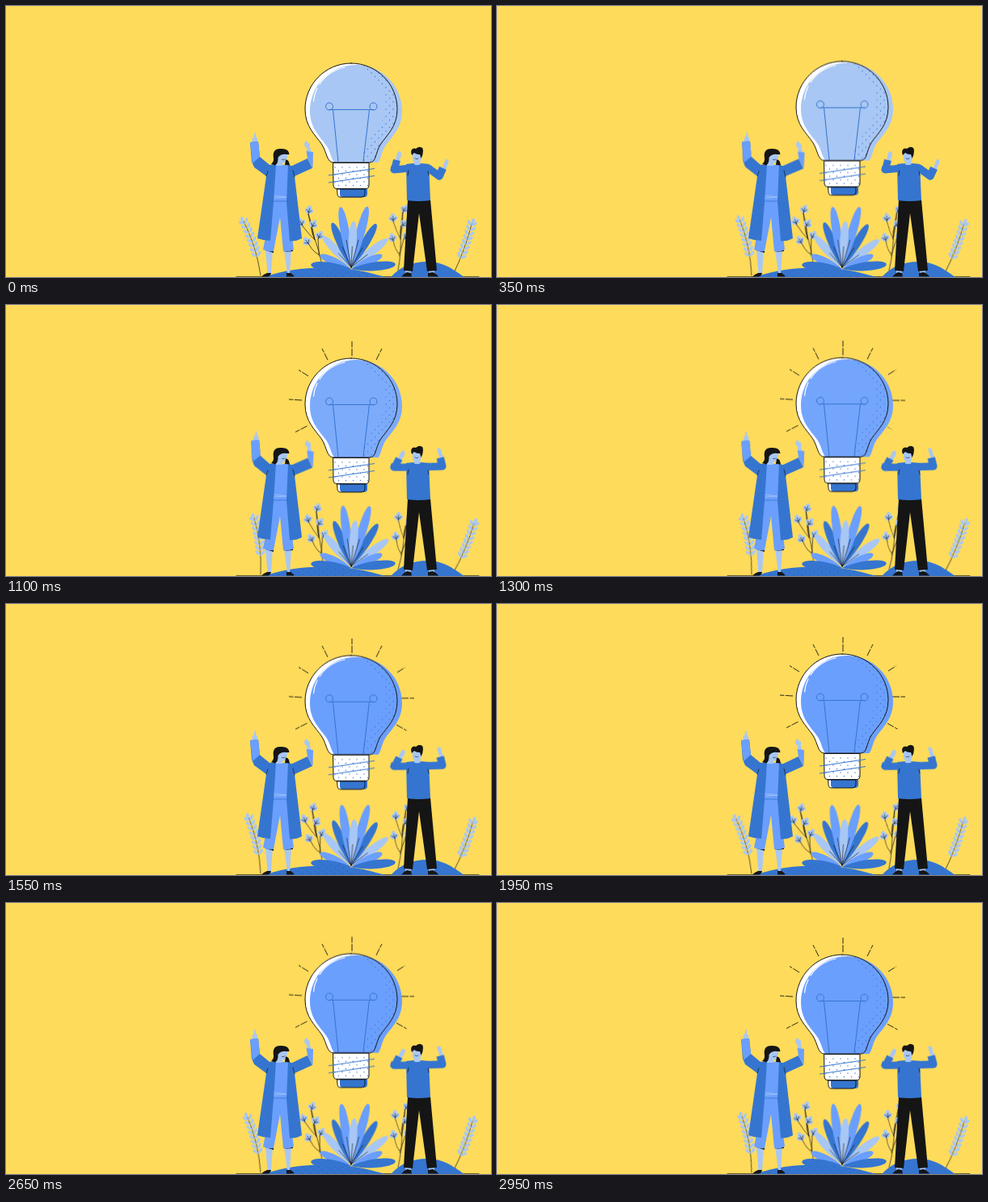
Animation of 600x336 px, one loop 3000 ms. Source, as an HTML page:

```html
<!DOCTYPE html>
<html lang="en">
<head>
<meta charset="utf-8">
<title>Bright idea</title>
<style>
@property --p { syntax: "<number>"; inherits: true; initial-value: 0; }
:root { --light: #a8c7f4; --mid: #6b9ffd; --dark: #3575d0; --ink: #151515; }
html, body { margin: 0; width: 100%; height: 100%; overflow: hidden; background: #fedb5a; }
svg { display: block; width: 600px; height: 336px; }
.light { fill: var(--light); }
.mid { fill: var(--mid); }
.dark { fill: var(--dark); }
.ink { fill: var(--ink); }
.white { fill: #fff; }
.line { fill: none; stroke: var(--ink); stroke-linecap: round; stroke-linejoin: round; }
.wire { fill: none; stroke: var(--dark); }
.sleeve { fill: none; stroke: var(--dark); stroke-linejoin: round; }

.sway, .bulb, .glow, .rays, .lift, .armL, .foreL, .wave {
  animation: 3s linear infinite;
}
/* Quadratic ease-out per swing; the last swing is cut half way. */
.sway { animation-name: sway; }
@keyframes sway {
  0% { transform: rotate(0deg); animation-timing-function: cubic-bezier(.333,.667,.667,1); }
  40% { transform: rotate(var(--a)); animation-timing-function: cubic-bezier(.333,.667,.667,1); }
  80% { transform: rotate(0deg); animation-timing-function: cubic-bezier(.333,.444,.667,.778); }
  100% { transform: rotate(calc(var(--a) * .75)); }
}
.bulb { animation-name: rise; }
@keyframes rise {
  0% { transform: translateY(0); animation-timing-function: cubic-bezier(.333,.667,.667,1); }
  40% { transform: translateY(-5px); animation-timing-function: cubic-bezier(.333,.6,.667,1); }
  80% { transform: translateY(-9.8px); animation-timing-function: cubic-bezier(.333,.444,.667,.778); }
  100% { transform: translateY(-6.8px); }
}
.glow { animation-name: glow; }
@keyframes glow {
  0%, 13% { fill: #a8c7f4; }
  25% { fill: #8bb4f9; }
  37% { fill: #7dabfb; }
  50%, 100% { fill: #6b9ffd; }
}
.rays { animation-name: rays; }
@keyframes rays { 0%, 19% { --p: 0; } 45%, 100% { --p: 9; } }
.ray { transform: scale(clamp(0, var(--p) - var(--i), 1)); }
.lift { animation-name: lift; }
@keyframes lift {
  0%, 11.7% { transform: rotate(0deg); animation-timing-function: ease-in-out; }
  37%, 100% { transform: rotate(-38deg); }
}
.armL { animation-name: armL; }
@keyframes armL {
  0%, 11.7% { transform: rotate(0deg); }
  25% { transform: rotate(12deg); }
  37%, 100% { transform: rotate(5deg); }
}
.foreL { animation-name: foreL; }
@keyframes foreL {
  0%, 11.7% { transform: rotate(0deg); }
  25% { transform: rotate(-15deg); }
  37%, 100% { transform: rotate(9deg); }
}
.wave { animation-name: wave; animation-timing-function: ease-in-out; }
@keyframes wave { 0%, 50%, 100% { transform: rotate(0deg); } 25% { transform: rotate(var(--a)); } }
</style>
</head>
<body>
<svg viewBox="0 0 600 336" xmlns="http://www.w3.org/2000/svg">
  <defs>
    <path id="glass" d="M427 71C459 71 484 97 484 128C484 150 471 160 463 172C457 182 458 194 450 194H405C397 194 397 182 391 172C383 160 370 150 370 128C370 97 395 71 427 71Z"/>
    <path id="screw" d="M405 194.500H449V222Q449 226.500 445 226.500H409Q405 226.500 405 222Z"/>
    <path id="tip" d="M410 227H444V233Q444 237 440 237H414Q410 237 410 233Z"/>
    <pattern id="dots" width="9" height="9" patternUnits="userSpaceOnUse">
      <circle cx="2" cy="2" r=".7" class="dark"/><circle cx="6.500" cy="6.500" r=".7" class="dark"/>
    </pattern>
    <pattern id="soil" width="10" height="7" patternUnits="userSpaceOnUse">
      <circle cx="2" cy="2" r=".5" fill="#1d4b9c"/><circle cx="7" cy="5.500" r=".5" fill="#1d4b9c"/>
    </pattern>
    <clipPath id="inGlass"><use href="#glass"/></clipPath>
    <clipPath id="aboveCap"><path d="M360 60H500V194H360Z"/></clipPath>
  </defs>

  <path class="line" d="M285 335.500H585" stroke-width=".6"/>

  <g id="plants"></g>

  <!-- mounds -->
  <path class="dark" d="M318 336C345 328 365 324.500 392 324.500C424 324 440 328 470 336Z"/>
  <path fill="url(#soil)" d="M330 336C350 329 365 326 392 326C420 326 440 329 462 336Z"/>
  <path class="dark" d="M476 336C488 323 503 317 521 317C541 317 552 326 567 336Z"/>

  <!-- bulb -->
  <g class="bulb">
    <g class="rays line" id="rays" stroke-width=".9"></g>
    <use href="#glass" class="white"/>
    <g clip-path="url(#aboveCap)"><use href="#glass" class="glow" x="6" y="2"/></g>
    <g clip-path="url(#inGlass)">
      <path fill="url(#dots)" d="M432 73C462 84 478 112 465 143C457 161 440 172 438 194H490V73Z"/>
    </g>
    <path class="wire" d="M411 193L404.500 128.500M442 193L449.500 128.500M400 128.500H455"/>
    <circle class="wire" cx="400" cy="124.500" r="4.500"/>
    <circle class="wire" cx="454.500" cy="124.500" r="4.500"/>
    <path d="M380.500 118C381 112 382.500 107 385 102M388 97C395 86 406 79 419 76" fill="none" stroke="#fff" stroke-width="1.200" stroke-linecap="round"/>
    <use href="#glass" class="line"/>
    <use href="#screw" class="white"/>
    <path fill="url(#dots)" d="M406 196H448V225H406Z"/>
    <use href="#screw" class="line"/>
    <path class="wire" d="M399 210L456 201.500M399 219L456 210.500"/>
    <use href="#tip" class="white"/>
    <use href="#tip" class="dark" x="3" clip-path="url(#inTip)"/>
    <use href="#tip" class="line"/>
  </g>

  <!-- woman -->
  <path class="light" d="M321 302H330L328 332H323.500ZM344 302H353L351 332H348Z"/>
  <path class="ink" d="M316 335.500Q318 333 323 331H328Q327 335 324 335.500ZM347 331H352L356 334V335.500H347Z"/>
  <path class="ink" d="M321 303H331V306ZM343 305L355 302.500V304Z"/>
  <path class="mid" d="M330 241H348L356 302Q350 305 343 304L339 262L331 304Q324 305 318 302Z"/>
  <g transform="translate(324 203)"><g class="wave" style="--a:4deg">
    <path class="light" d="M-19 -33L-19.500 -38L-17.500 -41L-16.500 -46L-15.300 -46L-15 -41L-13 -39L-13 -33Z"/>
    <path class="dark" d="M-22 -34L-12 -35L-10 -16L2 -6L-2 8L-17 -3L-20 -10Z"/>
    <path class="mid" d="M-22 -34L-12 -35L-10 -16L-19 -8Z"/>
  </g></g>
  <g transform="translate(354 205)"><g class="wave" style="--a:3deg">
    <path class="light" d="M18 -23V-29L15 -32L15.500 -36L18 -38L20 -34.500L22 -35L22 -30L23.500 -23Z"/>
    <path class="dark" d="M-4 -5L19 -16L25 -4L3 6Z"/>
    <path class="mid" d="M17.500 -25L26 -24L25.500 -4L19 -16Z"/>
  </g></g>
  <path class="mid" d="M331 197H350L348 243H330Z"/>
  <path d="M331 235L347 237M331 238L347 237" fill="none" stroke="#a8c7f4" stroke-width=".8"/>
  <path d="M331 242H347" class="wire" stroke-width=".8"/>
  <path class="dark" d="M324 197L334 196.500L331 243L327 291Q319 291 311 288L322 211Z"/>
  <path class="dark" d="M349 196.500L355 199L357 211L366 288Q359 292 351 291.500L347 243Z"/>
  <path class="line" d="M357 212L355 204M322 211L324 205" stroke-width=".7"/>
  <path class="light" d="M334 186Q342 181 348.500 184L347 191Q345 195 342 194.500V198H334Z"/>
  <path class="ink" d="M331 189Q329 177 339 177Q350 176 350.500 184L347 184Q340 183 336.500 188Q337 195 333 197.500L328 196Q331.500 193 331 189ZM346 190.500Q350 190 351 197.500L345 197Z"/>
  <path class="line" d="M341.500 190.500Q343.500 191.500 345 190" stroke-width=".6"/>

  <!-- man -->
  <path class="light" d="M494 326H501V332H494ZM523 326H530V332H523Z"/>
  <path class="ink" d="M489 335.500Q492 332 496 330L501 331L502 335.500ZM522 335.500V331L528 330Q534 333 535 335.500Z"/>
  <path class="ink" d="M497 240H525L533 328L521 329L511 257L503 329L492 328Z"/>
  <g transform="translate(499 200)"><g class="armL">
    <g transform="translate(-19 5)"><g class="foreL">
      <path class="light" d="M2 -12L3 -19L4.500 -24L7 -25L9 -23L8.500 -18L6 -12Z"/>
      <path class="sleeve" d="M3.500 -14L0 0" stroke-width="9"/>
    </g></g>
    <path class="sleeve" d="M-18 -1L-19 3L2 1" stroke-width="9"/>
  </g></g>
  <g transform="translate(522 200)"><g class="lift">
    <path class="light" d="M17 4L19.500 -4L22 -10L25 -9.500L25.500 -6L23.500 -2L21 6Z"/>
    <path class="sleeve" d="M-1 0L14 11L18.500 1" stroke-width="9.500"/>
  </g></g>
  <path class="dark" d="M495 196Q509 194 523 196L525 241Q510 243 496 241Z"/>
  <path class="line" d="M497 210L498 204M523 210L522 205" stroke-width=".7"/>
  <path class="light" d="M503 182L514 180V188Q513 191 512.500 192V196.500Q508 198 505 196.500V193Q503 192 503 189Z"/>
  <path class="ink" d="M502 185Q500 180 502.500 177.500Q505 176 507 177Q512 173 515.500 176.500Q517 183 513.500 189L512 184Q508 184.500 505 182Z"/>
  <path class="line" d="M506 189Q508 191 510 189" stroke-width=".6"/>
</svg>
<script>
const add = (id, html) => document.getElementById(id).insertAdjacentHTML("beforeend", html);

// Puts a part at a base point where it sways by the given angle.
const sway = (x, y, deg, body, turn = 0) =>
  `<g transform="translate(${x} ${y}) rotate(${turn})"><g class="sway" style="--a:${deg}deg">${body}</g></g>`;

const blade = (deg, len, w, tone) =>
  `<path class="${tone}" transform="rotate(${deg})" d="M0 0C${-w} ${-len * .4} ${-w * .8} ${-len} 0 ${-len}C${w * .8} ${-len} ${w} ${-len * .4} 0 0Z"/>`;

const vein = (deg, len) =>
  `<path class="line" transform="rotate(${deg})" d="M0 0V${-len}" stroke-width=".6"/>`;

// Curved stem with pairs of leaflets.
function fern(tx, ty, cx, cy) {
  let out = `<path class="line" d="M0 0Q${cx} ${cy} ${tx} ${ty}" stroke-width=".7"/>`;
  for (let i = 0; i < 8; i++) {
    const t = .32 + i * .085, u = 1 - t;
    const x = 2 * u * t * cx + t * t * tx, y = 2 * u * t * cy + t * t * ty;
    const dir = Math.atan2(u * cx + t * (tx - cx), -(u * cy + t * (ty - cy))) * 180 / Math.PI;
    for (const side of [-1, 1])
      out += `<g transform="translate(${x} ${y})">${blade(dir + side * 42, 8.5, 2.7, "light")}</g>`;
  }
  return out + `<g transform="translate(${tx} ${ty + 4})">${blade(Math.sign(tx) * 12, 8, 3, "light")}</g>`;
}

// Twig: each leaf is [x, y, angle, height where its branch starts].
function twig() {
  const tips = [[-18, -70, 12, -40], [-25, -55, -25, -38], [-14, -53, 28, -38], [-17, -32, -35, -20], [-6, -39, 25, -18]];
  let out = '<path class="line" d="M0 0Q-4 -26 -13 -46L-18 -70" stroke-width=".7"/>';
  for (const [x, y, deg, from] of tips) {
    const sx = from * .26;
    out += `<path class="line" d="M${sx} ${from}Q${(sx + x) / 2} ${y + 10} ${x} ${y}" stroke-width=".7"/>
      <g transform="translate(${x} ${y})">${blade(deg - 35, 8, 3.2, "light")}${blade(deg + 35, 8, 3.2, "light")}${blade(deg, 11, 4, "light")}
      <path class="line" transform="rotate(${deg})" d="M0 0V-7M0 -2L3 -5M0 -2L-3 -5" stroke-width=".6"/></g>`;
  }
  return out;
}

const tall = [[-42, 52, 7.5, "light"], [52, 57, 7.5, "light"], [-23, 60, 7.5, "dark"], [30, 62, 7.5, "dark"],
  [-10, 76, 8, "mid"], [15, 78, 8, "mid"], [3, 57, 7.5, "light"]];
const low = [[-66, 42, 7, "mid"], [66, 42, 7, "mid"], [-84, 50, 8, "dark"], [84, 55, 8, "dark"]];
const blades = list => list.map(b => blade(...b)).join("");
const veins = tall.map(([deg, len]) => vein(deg, len * .45)).join("");

add("plants",
  sway(315, 334, 11, fern(-22, -69, -5, -36)) +
  sway(553, 333, 2.5, fern(24, -66, 15, -30)) +
  sway(392, 328, 8, twig()) +
  sway(485, 328, 6, twig(), 19) +
  sway(427, 324, 2.2, blades(tall) + veins) +
  `<g transform="translate(427 326)">${blades(low)}</g>`);

// Rays from inner to outer point, clockwise from lower left.
const rays = [[372.5, 155, 358, 162.5], [366, 123, 350, 122], [374, 93, 362, 85.5], [398, 73, 391, 59], [428, 68, 428, 50],
  [458, 73, 465, 59], [484, 92, 493.5, 86], [489, 124, 505, 124], [483, 157, 495.5, 164]];
add("rays", rays.map(([x, y, u, v], i) =>
  `<g transform="translate(${x} ${y})"><path class="ray" style="--i:${i}" d="M0 0L${u - x} ${v - y}" stroke-dasharray="9 1.500" stroke-linecap="butt"/></g>`).join(""));
</script>
</body>
</html>
```
